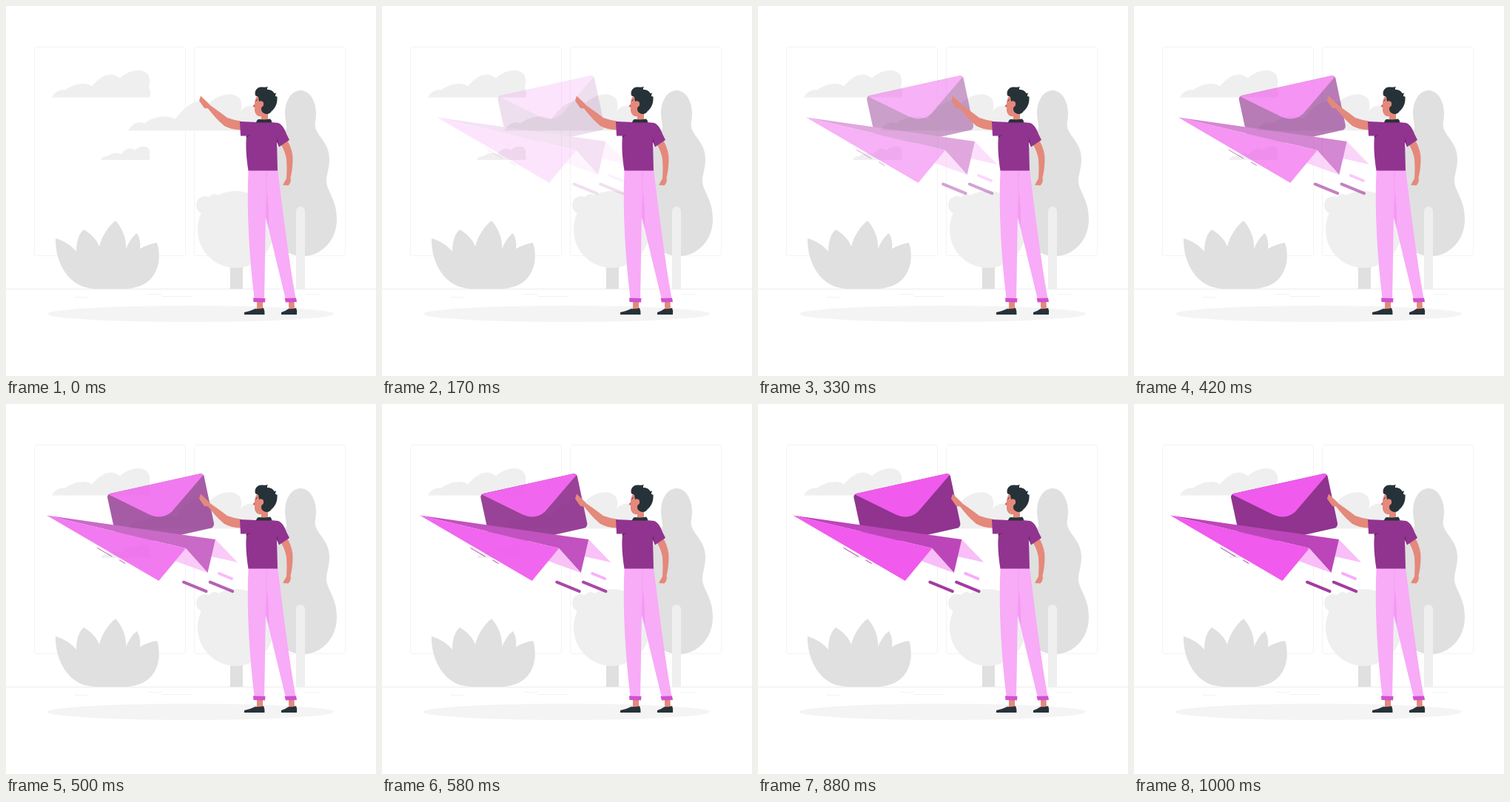
An HTML page with a canvas for the animation above (1.04 s loop, 500 px wide and 500 px high).

```html
<!DOCTYPE html>
<html lang="en">
<head>
<meta charset="utf-8">
<title>Sending mail</title>
<style>
html, body { margin: 0; width: 100%; height: 100%; overflow: hidden; background: #fff; }
canvas { display: block; width: 500px; height: 500px; }
</style>
</head>
<body>
<canvas id="stage" width="500" height="500"></canvas>
<script>
const SIZE = 500, LOOP = 1040, FRAME = 125 / 3, SLIDE = 30;
const SKIN = '#e4897b', DARK = '#263238', SHIRT = '#90348f', PANTS = '#f8abf7';
const PINK = '#f05aed', MID = '#bd45ba', PALE = '#f9bdf7', PLUM = '#a33ba1';
const GREY = '#e0e0e0', MIST = '#efefef', FAINT = '#f4f4f4';

const view = document.getElementById('stage').getContext('2d');

function layer() {
  const c = document.createElement('canvas');
  c.width = c.height = SIZE;
  return c.getContext('2d');
}

function fill(g, color, d) {
  g.fillStyle = color;
  g.fill(new Path2D(d));
}

function stroke(g, color, width, d) {
  g.strokeStyle = color;
  g.lineWidth = width;
  g.lineCap = 'round';
  g.stroke(new Path2D(d));
}

function oval(g, color, x, y, rx, ry) {
  g.fillStyle = color;
  g.beginPath();
  g.ellipse(x, y, rx, ry, 0, 0, Math.PI * 2);
  g.fill();
}

function pane(g, x) {
  g.strokeStyle = '#f3f3f3';
  g.lineWidth = 1;
  g.beginPath();
  g.roundRect(x, 55.5, 204, 282, 3);
  g.stroke();
}

// Origin is the lower left tip of the cloud
function cloud(g, x, y, scale) {
  g.save();
  g.translate(x, y);
  g.scale(scale, scale);
  fill(g, MIST, 'M0 0C4-7 10-11 18-10C28-18 45-22 54-15C62-24 77-39 92-26C101-35 120-41 129-32C133-27 133-19 131-13C134-9 133-3 132.500 0Z');
  g.restore();
}

function drawScene(g) {
  g.fillStyle = '#fff';
  g.fillRect(0, 0, SIZE, SIZE);
  pane(g, 38.5);
  pane(g, 254.5);
  cloud(g, 62, 123.5, 1);
  cloud(g, 128, 208, 0.5);
  fill(g, MIST, 'M165 168.500C170 160 178 154 187 159C195 151 216 145 229 153C237 142 254 121 275 131C285 121 305 114 315 124C319 129 319 136 317 142C323 135 333 131 341 140C347 145 350 158 350 168.500Z');

  g.fillStyle = '#ececec';
  g.fillRect(0, 382, SIZE, 1);
  for (const [x, y, w] of [[93, 393, 19], [192, 389, 18], [211, 392, 40], [404, 389, 20]]) {
    g.fillStyle = '#f2f2f2';
    g.fillRect(x, y, w, 1);
  }
  oval(g, FAINT, 249.5, 416, 193.5, 11);

  fill(g, GREY, 'M67 314C78 317 89 324 95 332C95 319 98 308 105 302C114 307 123 316 126 325C130 310 138 298 148 290C157 300 163 314 162 328C166 319 171 311 177 307C181 314 182 321 181 328C188 324 196 321 204 320C212 343 205 382 160 382L121 382C84 382 66 345 67 314Z');

  fill(g, GREY, 'M398 114C410 114 419 128 419 145C419 153 417 159 418 164C422 178 437 185 437 207C437 219 433 227 433 237C434 252 447 261 447 288C447 318 425 338 402 338C376 338 357 318 357 289C357 263 366 252 367 238C366 225 361 216 363 203C365 186 378 178 379 164C379 158 377 153 377 145C377 128 386 114 398 114Z');
  g.fillStyle = MIST;
  g.beginPath();
  g.roundRect(392, 271, 12, 111, [6, 6, 0, 0]);
  g.fill();

  g.fillStyle = GREY;
  g.fillRect(303, 348, 17, 34);
  oval(g, MIST, 310.5, 302, 51.5, 52);
  oval(g, MIST, 269, 269, 12, 12);
  oval(g, MIST, 282, 263, 9, 9);
}

function drawMan(g) {
  // Feet and legs
  fill(g, SKIN, 'M339 399H347L347 410H339Z M382 399H389.500L390 410H382Z');
  fill(g, DARK, 'M322 414Q331 412 337 409Q343 410 348 408Q350 412 349.500 417H322Z M372 414Q378 412 382 409Q387 410 392 408Q394 412 393 417H372Z');
  stroke(g, '#e7d3f2', 1.3, 'M334 409.500L338 408M380 409.500L382.500 408');
  fill(g, PANTS, 'M327.500 221H367C372 258 380 330 391.500 395H377.500L351 285C350 325 350 360 349 395H335.500C329 340 325 282 327.500 221Z');
  fill(g, '#f598f4', 'M352 246C353 258 356 270 355 299L351 285Z');
  stroke(g, '#f598f4', 0.7, 'M352.500 224Q351 236 352 248');
  fill(g, '#d150cf', 'M334 394.500L350.500 395L350 400.500L334.500 400Z M376.500 395L392 394.500L393 400L378 400.500Z');

  // Arms
  fill(g, SKIN, 'M263 121.500L271 129L277 135Q290 144 299 151Q307 154 317 155.500V167.500Q304 167 295 162Q284 153 273 138.500L268 138L261 128Z');
  fill(g, SKIN, 'M371.500 187L380.500 182Q388 196 387.500 208Q387 223 384.500 232Q386 238 381.500 242.500L374 242L379 233Q380 220 379 207Q377 196 371.500 187Z');

  // Head
  fill(g, SKIN, 'M345 140L354 142V155H345Z');
  fill(g, SKIN, 'M338 123Q336 129 336 132L333.500 136L336 137Q335 147 342 149Q347 150 350 145L354 130L347 121Z');
  fill(g, DARK, 'M337 121C335 114 340 109 346 109.500Q351 110 354 109Q352 111.500 353 113Q360 113 362.500 118L365 117.500Q364 120 364 122L366.500 122.500C367 132 364 138 359 142C356 147 350 147 346 143Q344 139 346 136L347 130Q345 127 342 129L341 123Z');
  oval(g, SKIN, 345.3, 132.5, 2.8, 3.7);
  stroke(g, DARK, 0.9, 'M337.500 128.500L339.500 126.500');
  oval(g, '#b84d4d', 335.3, 135, 0.9, 0.9);

  // Shirt
  fill(g, SHIRT, 'M316 156L338 157Q353 156 368 158Q375 161 379 173L383 181L369 190.500L366 183L367 222.500H327.500C325 206 323.500 191 325 175.500H317Z');
  fill(g, '#64245f', 'M324.500 176L331 173.500L325 178Z M367 177L366 183L369 190.500Q367 185 367 177Z');
  fill(g, DARK, 'M338 157.500Q339 153 342 153Q350 154 357 152.500Q359 154 359 157.500Z');
}

function drawMail(g) {
  // Envelope
  fill(g, SHIRT, 'M135 121L256 94.300Q260 93.500 261.500 97L275 161Q275.500 165 272 167.500L203 183L150 192L141 172L131 126Q131 122 135 121Z');
  fill(g, PINK, 'M132.500 122.300L135 121L256 94.300Q259 93.500 260.500 96L218 145.500Q205 157 188 149.500Z');
  // Plane
  fill(g, PALE, 'M277 183L307 214L271 206Z M237 195L266 228L222 212Z');
  fill(g, MID, 'M49 150.500L277 183L266.500 228L237 195Z');
  fill(g, PINK, 'M49 150.500L237 195L200.500 239Z');
  // Speed marks
  stroke(g, PLUM, 4, 'M234 240.700L264.500 253.200M269.700 240.700L300.200 253.200');
  stroke(g, '#f8abf7', 4, 'M282 229L299 236');
  stroke(g, PLUM, 1, 'M117.500 194.500L137 206M147.500 211L155 215.500');
}

// Cubic Bezier easing with a small overshoot
function ease(x) {
  const curve = (s, a, b) => 3 * (1 - s) * (1 - s) * s * a + 3 * (1 - s) * s * s * b + s * s * s;
  let lo = 0, hi = 1;
  for (let i = 0; i < 24; i++) {
    const s = (lo + hi) / 2;
    if (curve(s, 0.36, 0.5) < x) lo = s; else hi = s;
  }
  return curve(hi, -0.01, 1.38);
}

const scene = layer(), man = layer(), mail = layer();
drawScene(scene);
drawMan(man);

function render(t) {
  // 24 steps per second, on a 10 ms clock
  const step = Math.floor((Math.floor(t / 10) * 10 + 4.9) / FRAME);
  view.globalAlpha = 1;
  view.drawImage(scene.canvas, 0, 0);
  if (step > 1) {
    const p = ease(Math.min(1, (step + 1) / 24.5));
    mail.setTransform(1, 0, 0, 1, 0, 0);
    mail.clearRect(0, 0, SIZE, SIZE);
    mail.translate(SLIDE * (1 - p), 0);
    drawMail(mail);
    view.globalAlpha = Math.max(0, Math.min(1, p));
    view.drawImage(mail.canvas, 0, 0);
    view.globalAlpha = 1;
  }
  view.drawImage(man.canvas, 0, 0);
}

let start = null;
function tick(now) {
  if (start === null) start = now;
  render((now - start) % LOOP);
  requestAnimationFrame(tick);
}
render(0);
requestAnimationFrame(tick);
</script>
</body>
</html>
```
